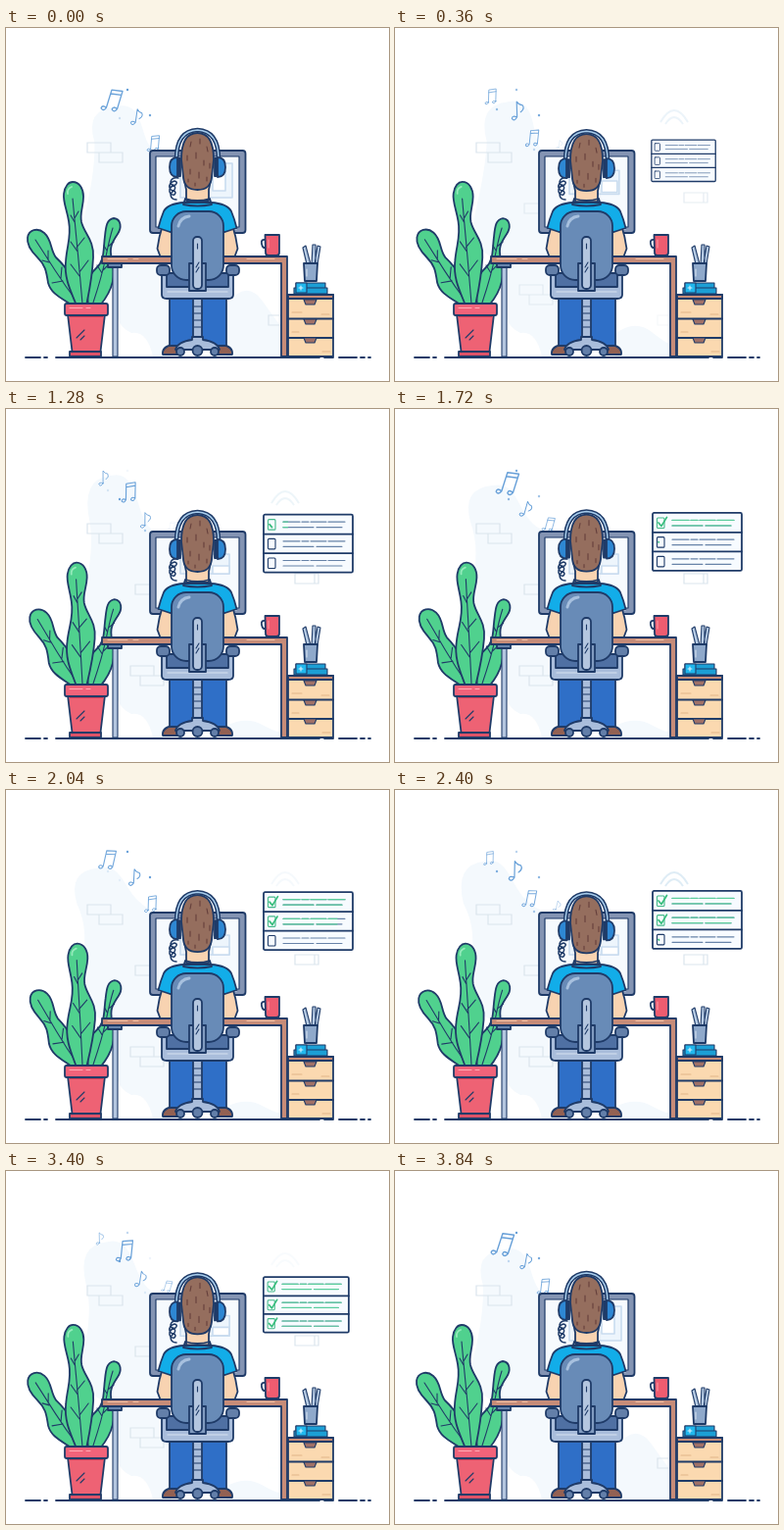
An HTML page that plays this animation: 391 px wide and 360 px high, repeating every 3880 ms.

```html
<!DOCTYPE html>
<html lang="en">
<head>
<meta charset="utf-8">
<title>Working at the desk</title>
<style>
  html, body { margin: 0; width: 100%; height: 100%; overflow: hidden; background: #fff; }
  svg { display: block; width: 391px; height: 360px; }
  .ink { stroke: #1f3b68; stroke-width: 1.8; stroke-linejoin: round; stroke-linecap: round; fill: none; }
  .thin { stroke-width: 1.1; }
  .faint { stroke: #dbe5ed; stroke-width: 1.2; fill: none; }
  .note { stroke: #669fd8; stroke-width: 1.3; fill: none; stroke-linecap: round; stroke-linejoin: round; }
</style>
</head>
<body>
<svg viewBox="0 0 391 360">
  <!-- backdrop -->
  <g fill="#f4f9fd"><path id="blob"/><path id="mound"/></g>
  <g class="faint">
    <path d="M83 117h24v10h-24zM95 127h24v10h-24z"/>
    <path id="bricks" d="M148 179h-16v10h16M127 262h24v10h-24zM137 272h24v10h-24z"/>
    <path id="farBrick" d="M282 293h-14v10h14"/>
    <g id="behind">
      <path d="M299 168h16v10M295 168v10h24v-10z"/>
      <path id="wifi" stroke="#d6e7f2" stroke-width="2" d="M271 96Q285 72 299 96M276 98Q285 84 294 98"/>
    </g>
  </g>
  <g id="notes"></g>
  <g id="sparks" fill="#669fd8"></g>

  <!-- checklist -->
  <g id="panel" class="ink">
    <rect width="91" height="59" rx="1.5" fill="#f7fbff"/>
    <path d="M0 20H91M0 39.5H91"/>
    <g id="rows"></g>
  </g>

  <!-- monitor -->
  <g class="ink">
    <rect x="147" y="125" width="97.500" height="84" rx="3" fill="#8494b3"/>
    <rect x="153" y="131" width="85" height="72" fill="#f6fafe" stroke-width="1.2"/>
    <g stroke="#c9dcef" stroke-width="1.6">
      <rect id="pane" x="178" fill="#edf5fc"/>
      <rect id="inset" x="211" fill="#fff"/>
    </g>
    <path d="M157 205.500h8M229 205.500h6" stroke="#c2cee0" class="thin"/>
  </g>

  <!-- legs, arms and shirt -->
  <g class="ink">
    <path d="M160 333q-1-8 10-10h5v10zM231 333q1-8-10-10h-5v10z" fill="#936153"/>
    <path d="M167 270h58v54h-26l-3-30-4 30h-25z" fill="#2f6fc7"/>
    <path d="M160 201q-4 12-5.500 24l3 8h16v-28zM231 201q4 12 5.500 24l-3 8h-16v-28z" fill="#f8d3b1"/>
    <path d="M182 178q-17 1-21 9-3 7-5.500 17l12 4h56l12-4q-2.500-10-5.500-17-4-8-21-9z" fill="#12ade9"/>
    <path d="M170 207l2-14M221 207l-2-14" class="thin"/>
    <path d="M176 153q-7-1-8 4 0 4 5 3 3-3-1-4-6 2-5 7 2 4 5 2 2-4-2-4-5 3-2 8 4 3 5-1-1-4-5 1 0 6 6 6" stroke-width="1.500"/>
  </g>

  <!-- head -->
  <g id="head" class="ink">
    <path d="M181 150l3 15v11h23v-11l3-15z" fill="#f8d3b1"/>
    <path d="M179 134q0-27 16.500-27t16.500 27l-2 18q-1 13-14.500 13T181 152z" fill="#956e5e"/>
    <path d="M189 116l-1 5M198 113v5M205 121l1 5M185 130v5M194 127v6M202 135v5M208 138v5M188 144v5M197 147v6M205 152v4M186 154v3M193 158v3" stroke="#653f3b" class="thin"/>
    <path d="M174 134q0-29 21.500-30 21.500 1 21.500 30" stroke-width="4.500"/>
    <path d="M174 134q0-29 21.500-30 21.500 1 21.500 30" stroke="#a8cdec" stroke-width="1.500"/>
    <path d="M175 132v20q-8 0-8-10t8-10zM216 132v20q8 0 8-10t-8-10z" fill="#2e87d3"/>
    <path d="M176 133h2v18h-2zM213 133h2v18h-2z" fill="#1f3b68"/>
  </g>
  <path class="ink" d="M183 174q12.500 4 25 0l2 6q-14.500 3-29 0z" fill="#12ade9"/>

  <!-- plant -->
  <g class="ink">
    <g id="leafR">
      <path d="M84 283c-2-18-2-29 8-38 9-8 7-18 9-33 1-10 2-17 9-18 8 1 8 10 4 16-6 9-9 14-6 26 4 16 2 30-12 47z" fill="#50d18e"/>
      <path d="M89 280Q98 253 102 233T109 204M98 250l-5-8M99 247l8-8M103 227l-3-5M104 223l6-5" class="thin"/>
    </g>
    <g id="leafL">
      <path d="M68 283c-12-8-22-12-25-23-2-13-3-18-11-26-7-7-11-13-10-20 1-8 10-11 17-5 8 7 6 17 12 25 13 12 20 25 28 49z" fill="#50d18e"/>
      <path d="M74 281Q61 264 50 247T30 216M58 258l-11 2M56 255l1-11M44 239l-7-2M43 237v-10" class="thin"/>
    </g>
    <g id="leafM">
      <path d="M72 283c-5-13-13-27-11-45 1-16 6-25 3-41-2-12-6-20-5-28 1-8 5-12 9-12 7 0 11 7 11 15 0 10-4 17-2 26 3 12 13 18 12 36-1 21-4 34-7 49z" fill="#50d18e"/>
      <path d="M78 281Q74 236 72 216T68 174M75 253l-9-12M75 249l9-12M73 228l-7-10M72 224l8-10M70 198l-4-7M70 194l4-7" class="thin"/>
      <path d="M63 169q-1-5 4-7" stroke="#95ebbb"/>
    </g>
    <path d="M63 292h38l-5 42H68z" fill="#ee6274"/>
    <path d="M65 330h32v5H65z" fill="#dc5368"/>
    <rect x="60" y="281" width="44" height="12" rx="2" fill="#f2637a"/>
    <path d="M65 285.500h13M82 285.500h4" stroke="#ffacb5" class="thin"/>
    <path d="M65 294.500h34" stroke="#c43f59" class="thin"/>
    <path d="M72 316l8-8M76 318l4-4" class="thin"/>
  </g>

  <!-- desk -->
  <g class="ink">
    <path d="M109 244h5v91h-5z" fill="#b4c6df" class="thin"/>
    <path d="M104 240h14v4h-14z" fill="#6885ad"/>
    <path d="M98 233h189v102h-6v-95H98z" fill="#c78c78"/>
    <path d="M104 235.500h20M130 235.500h5M246 235.500h28" stroke="#efc0a6" class="thin"/>
    <path d="M265 216q-5-1-4 4t4 4"/>
    <path d="M264.500 211h14.500v18q0 3-3 3h-8q-3 0-3-3z" fill="#ee5c70"/>
    <path d="M268 216v8" stroke="#ff98a5" class="thin"/>
  </g>

  <!-- chair -->
  <g class="ink">
    <path d="M191 276h9v40h-9z" fill="#a9bddb"/>
    <path d="M192 284h7M192 291h7M192 298h7M192 305h7" class="thin"/>
    <path d="M163 250h65v16h-65z" fill="#4f70a3"/>
    <rect x="169" y="187" width="53" height="70" rx="15" fill="#688bb7"/>
    <path d="M176 202q2-9 11-10" stroke="#a7c0de" stroke-width="3"/>
    <path d="M159 252h5v12h63v-12h5v20q0 4-5 4h-63q-5 0-5-4z" fill="#a9bddb"/>
    <path d="M165 269h61" stroke="#d7e2f0" class="thin"/>
    <rect x="154" y="242" width="13" height="10" rx="4" fill="#637fa9"/>
    <rect x="225" y="242" width="13" height="10" rx="4" fill="#637fa9"/>
    <path d="M187 240h17v28h-17z" fill="#819bc0"/>
    <rect x="191" y="213" width="9" height="53" rx="4" fill="#b4c6df"/>
    <path d="M195.500 220v5M194 244l3-5M194 249l3-5" class="thin"/>
    <path d="M173 328q2-8 17-10v-3h11v3q15 2 17 10z" fill="#a9bddb"/>
    <g fill="#637fa9"><circle cx="178" cy="330" r="4"/><circle cx="195.500" cy="329" r="5"/><circle cx="213" cy="330" r="4"/></g>
  </g>

  <!-- drawers -->
  <g class="ink">
    <path d="M288 272h46v63h-46z" fill="#fbd9b0"/>
    <path d="M288 272h46v4h-46z" fill="#c78c78"/>
    <path d="M288 296.500h46M288 316h46"/>
    <path d="M304 277h13l-2 5h-9zM304 297h13l-2 5h-9zM304 316h13l-2 5h-9z" fill="#a17167" class="thin"/>
    <path d="M292 290h10M322 292h8M292 310h7M323 330h8" stroke="#e2b58a" class="thin"/>
    <path d="M307 241l-4-17 3-2 5 19zM312 241l1-20h3v20zM315 241l3-19 3 1-3 18z" fill="#b5cae3" class="thin"/>
    <path d="M304 240h14l-1 18h-12z" fill="#8fa9cb"/>
    <path d="M307 246v7" stroke="#d7e2f0" class="thin"/>
    <path d="M296 260h30v5h-30zM294 265h34v6h-34z" fill="#1c9fd5" class="thin"/>
    <path d="M296 260h11v10h-11z" fill="#20b7ed" class="thin"/>
    <path d="M299 265h4M301 263v4" stroke="#d7f2ff" class="thin"/>
  </g>
  <path class="ink" d="M20 336h15M39 336h3M51 336h269M325 336h9M340 336h18M362 336h4M370 336h2"/>
</svg>
<script>
const LOOP = 3880, TAU = Math.PI * 2;
const $ = id => document.getElementById(id);
const set = (el, attrs) => { for (const k in attrs) el.setAttribute(k, attrs[k]); };
const clamp = x => Math.max(0, Math.min(1, x));
const smooth = x => (x = clamp(x), x * x * (3 - 2 * x));
const wave = (t, delay = 0, turns = 1) => Math.cos(TAU * turns * (t - delay) / LOOP);

// Linear interpolation through rows of [time, ...values].
function along(keys, t) {
  let i = 1;
  while (i < keys.length - 1 && keys[i][0] < t) i++;
  const a = keys[i - 1], b = keys[i], u = clamp((t - a[0]) / (b[0] - a[0]));
  return a.slice(1).map((v, j) => v + (b[j + 1] - v) * u);
}

// x, y, scale, opacity of a note by age
const flight = [
  [-700, 170, 119, .35, 0], [-450, 164, 117, .55, .7], [0, 151, 117, .7, .9],
  [460, 138, 110, .75, .9], [750, 134, 101, .75, 1], [950, 134, 90, .75, 1],
  [1280, 126, 84, .85, 1], [1720, 116, 75, 1.05, 1], [1900, 111, 74, 1.05, 1],
  [2050, 104, 70, .85, .9], [2400, 96, 69, .6, .8], [2620, 93, 62, .4, .5], [2690, 92, 61, .3, 0]
];
const pair = 'M-4 10V-9L7-11V8M-4-5L7-7M-4 10q-5-2-5 2 3 3 5-2zM7 8q-5-2-5 2 3 3 5-2z';
const single = 'M0 9L-1-9Q2-5 6-5 9-1 4 3M0 9q-6-2-6 2 3 4 6-2z';
const sparkSpots = [[124, 63], [104, 83], [116, 92], [147, 89], [142, 124]];

$('notes').innerHTML = [pair, single, pair, single].map(d => `<path class="note" d="${d}"/>`).join('');
$('sparks').innerHTML = sparkSpots.map(([x, y]) => `<circle cx="${x}" cy="${y}" r="1.2"/>`).join('');
const notes = [...$('notes').children], sparks = [...$('sparks').children];

const text = 'M20 7.500h17M39 7.500h7M48 7.500h16M66 7.500h17M20 13h31M54 13h26';
$('rows').innerHTML = [0, 1, 2].map(i => `<g transform="translate(0 ${i * 19.7})">
  <rect class="box" x="4.500" y="5" width="7.500" height="10.500" rx="1" stroke-width="1.1"/>
  <path d="${text}" stroke="#6783a8" stroke-width="1.1"/>
  <clipPath id="wipe${i}"><rect x="18" width="0" height="20"/></clipPath>
  <path d="${text}" stroke="#5bcd9c" stroke-width="1.2" clip-path="url(#wipe${i})"/>
  <path class="tick" d="M6 10l3 3.500 5.500-9" stroke="#37bd7c" stroke-width="1.7" pathLength="1"/></g>`).join('');
const boxes = document.querySelectorAll('.box'), ticks = document.querySelectorAll('.tick');
const wipes = document.querySelectorAll('clipPath rect');
const tickStarts = [1140, 1680, 2340];

function draw(t) {
  const shown = smooth((t - 100) / 400) * (1 - smooth((t - 3350) / 400)), hidden = 1 - shown;

  const dx = 12 * wave(t, 500), top = 72 + 8 * wave(t, 0, 2), cx = 104 + dx, side = 79 + dx * .3;
  $('blob').setAttribute('d', `M${cx} ${top}C${cx + 28} ${top - 6} ${cx + 24} 108 148 122
    L160 235Q172 290 168 335H150Q144 308 128 311 108 302 111 270L105 236
    Q${side - 10} 226 ${side} 185T${cx - 22} 116Q${cx - 32} ${top + 3} ${cx} ${top}Z`);
  const rise = 17 + 58 * hidden;
  $('mound').setAttribute('d', `M225 335V${335 - rise * .7}Q245 ${330 - rise} 262 ${335 - rise * .75}T281 ${335 - rise * .4}V335Z`);
  set($('bricks'), { opacity: shown });
  set($('farBrick'), { opacity: hidden });
  set($('behind'), { opacity: shown });
  set($('wifi'), { opacity: .5 + .5 * wave(t, 750, 2) });

  notes.forEach((note, i) => {
    const age = (t - i * LOOP / 4 + 700 + LOOP) % LOOP - 700;
    const [x, y, size, opacity] = along(flight, age);
    const tilt = 10 + 9 * Math.cos(TAU * (age - 1820) / 1100);
    set(note, { transform: `translate(${x} ${y}) rotate(${tilt}) scale(${size})`, opacity });
  });
  sparks.forEach((s, i) => set(s, { opacity: clamp(.4 + .6 * wave(t, i * 700, 2)) }));

  const px = 259 + 4 * shown, py = 105.3 + 2.4 * Math.cos(TAU * (t - 1180) / 2600);
  set($('panel'), {
    transform: `translate(${px} ${139 + (py - 139) * shown}) scale(${shown})`,
    visibility: shown > .01 ? 'visible' : 'hidden'
  });
  tickStarts.forEach((start, i) => {
    const u = smooth((t - start) / 420);
    set(ticks[i], { 'stroke-dasharray': `${u} 2`, opacity: u > 0 ? 1 : 0 });
    set(wipes[i], { width: 68 * smooth((t - start - 60) / 400) });
    boxes[i].style.stroke = u > .2 ? '#46b98a' : '';
  });

  set($('pane'), { y: 148 - 10 * hidden, width: 50 + 3 * hidden, height: 20 + 15 * hidden });
  set($('inset'), { y: 160 - 14 * hidden, width: 17 - 4 * hidden, height: 8 + 12 * hidden });

  set($('head'), { transform: `translate(0 ${.7 - .7 * wave(t, 0, 4)})` });
  const sway = 1.15 * (1 - wave(t, -120));
  set($('leafM'), { transform: `rotate(${sway} 79 283)` });
  set($('leafL'), { transform: `rotate(${sway} 76 283)` });
  set($('leafR'), { transform: `rotate(${sway * .25} 88 283)` });
}

function tick(now) {
  draw(Math.floor(now % LOOP / 40) * 40);
  requestAnimationFrame(tick);
}
draw(0);
requestAnimationFrame(tick);
</script>
</body>
</html>
```
